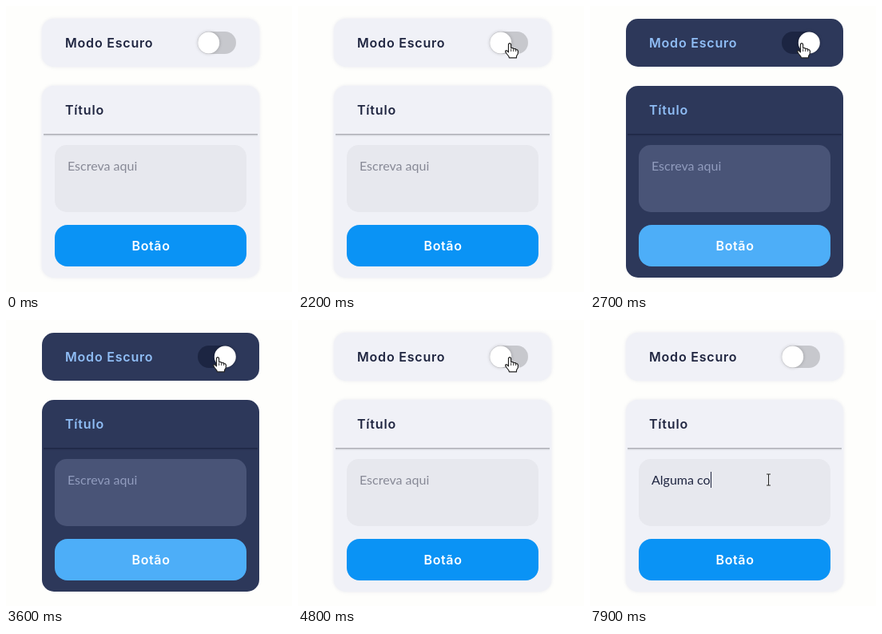
Write an HTML page with a canvas that moves like this. It is 358x358 px and loops after 8 s.

```html
<!DOCTYPE html>
<html lang="pt">
<head>
<meta charset="utf-8">
<title>Modo Escuro</title>
<style>
html, body { margin: 0; width: 100%; height: 100%; overflow: hidden; background: #fefefc; }
canvas { display: block; width: 358px; height: 358px; }
</style>
</head>
<body>
<canvas id="stage"></canvas>
<script>
const SIZE = 358, LOOP = 8000;
const canvas = document.getElementById('stage');
const ctx = canvas.getContext('2d');
const dpr = window.devicePixelRatio || 1;
canvas.width = canvas.height = Math.round(SIZE * dpr);

const HEAD = '600 16px Inter, sans-serif';
const BODY = '16px Lato, sans-serif';
const TYPED = 'Alguma coisa';

// Each colour runs from light to dark theme
const theme = {
  card: [[240, 241, 247], [45, 56, 90]],
  field: [[231, 232, 238], [73, 84, 119]],
  button: [[10, 147, 245], [77, 174, 248]],
  track: [[199, 200, 205], [28, 37, 66]],
  title: [[31, 37, 64], [144, 190, 246]],
  hint: [[135, 137, 150], [145, 156, 190]],
  line: [[172, 173, 180], [30, 38, 68]]
};

const clamp = v => Math.max(0, Math.min(1, v));
const mix = (a, b, k) => a + (b - a) * k;
const span = (t, from, to) => clamp((t - from) / (to - from));
const smooth = k => k * k * (3 - 2 * k);

function tone(name, k, alpha = 1) {
  const [a, b] = theme[name];
  return `rgba(${a.map((v, i) => Math.round(mix(v, b[i], k))).join(',')},${alpha})`;
}

// CSS "ease": cubic-bezier(.25, .1, .25, 1)
function ease(x) {
  if (x <= 0 || x >= 1) return clamp(x);
  const curve = (u, p, q) => 3 * u * (1 - u) ** 2 * p + 3 * u * u * (1 - u) * q + u ** 3;
  let lo = 0, hi = 1;
  for (let i = 0; i < 24; i++) {
    const mid = (lo + hi) / 2;
    if (curve(mid, 0.25, 0.25) < x) lo = mid; else hi = mid;
  }
  return curve(lo, 0.1, 1);
}

const darkness = t => ease(span(t, 2220, 2620)) - ease(span(t, 4360, 4760));

function box(x, y, w, h, r, fill) {
  ctx.beginPath();
  ctx.roundRect(x, y, w, h, r);
  ctx.fillStyle = fill;
  ctx.fill();
}

function text(str, x, y, font, fill, spacing = 0) {
  ctx.font = font;
  ctx.letterSpacing = spacing + 'px';
  ctx.fillStyle = fill;
  ctx.fillText(str, x, y);
}

function card(y, h, k) {
  ctx.save();
  ctx.shadowColor = `rgba(225,226,236,${0.8 * (1 - k)})`;
  ctx.shadowBlur = 4 * dpr;
  box(45, y, 272, h, 15, tone('card', k));
  ctx.restore();
}

function toggle(k) {
  box(240, 32, 48, 28, 14, tone('track', k));
  ctx.save();
  ctx.shadowColor = 'rgba(0,0,0,.22)';
  ctx.shadowBlur = 4 * dpr;
  ctx.beginPath();
  ctx.arc(mix(253.7, 274.3, k), 46, 13.5, 0, Math.PI * 2);
  ctx.fillStyle = '#fff';
  ctx.fill();
  ctx.restore();
}

function field(t, k) {
  box(61, 174, 240, 84, 15, tone('field', k));
  const count = t < 6900 ? 0 : Math.min(TYPED.length, Math.floor((t - 6900) / 120) + 1);
  const str = TYPED.slice(0, count);
  text(str || 'Escreva aqui', 77, 206, BODY, tone(str ? 'title' : 'hint', k));
  const caret = t >= 6000 && (count > 0 || (t - 6000) % 1000 < 500);
  if (caret) {
    const x = 77 + Math.round(ctx.measureText(str).width);
    ctx.fillStyle = tone('title', k);
    ctx.fillRect(x, 190, 1, 20);
  }
}

function shape(points) {
  ctx.beginPath();
  points.forEach(([x, y]) => ctx.lineTo(x, y));
  ctx.closePath();
  ctx.fillStyle = '#fff';
  ctx.strokeStyle = '#222';
  ctx.lineWidth = 1.2;
  ctx.lineJoin = 'round';
  ctx.fill();
  ctx.stroke();
}

function hand() {
  shape([[-1.5, 1], [0, 0], [1.5, 1], [1.7, 6], [4, 6.2], [5, 7], [7, 7.2], [8, 8],
    [9.6, 8.4], [10.5, 10], [10.2, 13.5], [8.6, 16], [8.4, 18.4], [-0.6, 18.4],
    [-1.2, 16.5], [-4, 13], [-5.4, 10.5], [-5, 9.3], [-3.4, 9.4], [-1.6, 11.4]]);
  ctx.beginPath();
  for (const x of [1.7, 4.7, 7.6]) {
    ctx.moveTo(x, 7);
    ctx.lineTo(x, 10.5);
  }
  ctx.lineWidth = 0.9;
  ctx.stroke();
}

function arrow() {
  shape([[0, 0], [0, 15], [3.5, 12], [6, 17.5], [8.2, 16.5], [5.8, 11], [10.5, 11]]);
}

function beam() {
  const strokes = (w, color) => {
    ctx.beginPath();
    ctx.moveTo(-2.5, -7); ctx.lineTo(2.5, -7);
    ctx.moveTo(0, -7); ctx.lineTo(0, 7);
    ctx.moveTo(-2.5, 7); ctx.lineTo(2.5, 7);
    ctx.lineWidth = w;
    ctx.strokeStyle = color;
    ctx.stroke();
  };
  strokes(2.6, 'rgba(255,255,255,.7)');
  strokes(1.1, '#222');
}

function pointer(t) {
  if (t < 1700) return;
  const enter = smooth(span(t, 1600, 2000));
  const leave = smooth(span(t, 5150, 5700));
  const x = mix(mix(344, 265, enter), 223.5, leave);
  const y = mix(mix(108, 46.5, enter), 200, leave);
  const inside = (l, top, r, b) => x > l && x < r && y > top && y < b;
  ctx.save();
  ctx.translate(x, y);
  if (inside(240, 32, 288, 60)) hand();
  else if (inside(61, 174, 301, 258)) beam();
  else arrow();
  ctx.restore();
}

function draw(t) {
  const k = darkness(t);
  ctx.setTransform(dpr, 0, 0, dpr, 0, 0);
  ctx.fillStyle = '#fefefc';
  ctx.fillRect(0, 0, SIZE, SIZE);

  card(16, 60, k);
  text('Modo Escuro', 74, 52, HEAD, tone('title', k), 0.8);
  toggle(k);

  card(100, 240, k);
  text('Título', 74, 136, HEAD, tone('title', k), 0.8);
  [1, 0.5, 0.2].forEach((alpha, i) => {
    ctx.fillStyle = tone('line', k, alpha);
    ctx.fillRect(47, 160 + i, 268, 1);
  });
  field(t, k);

  box(61, 274, 240, 52, 16, tone('button', k));
  ctx.textAlign = 'center';
  text('Botão', 181.5, 306, HEAD, '#fff', 0.6);
  ctx.textAlign = 'left';

  pointer(t);
}

const start = performance.now();
function tick() {
  draw((performance.now() - start) % LOOP);
  requestAnimationFrame(tick);
}
tick();
</script>
</body>
</html>
```
